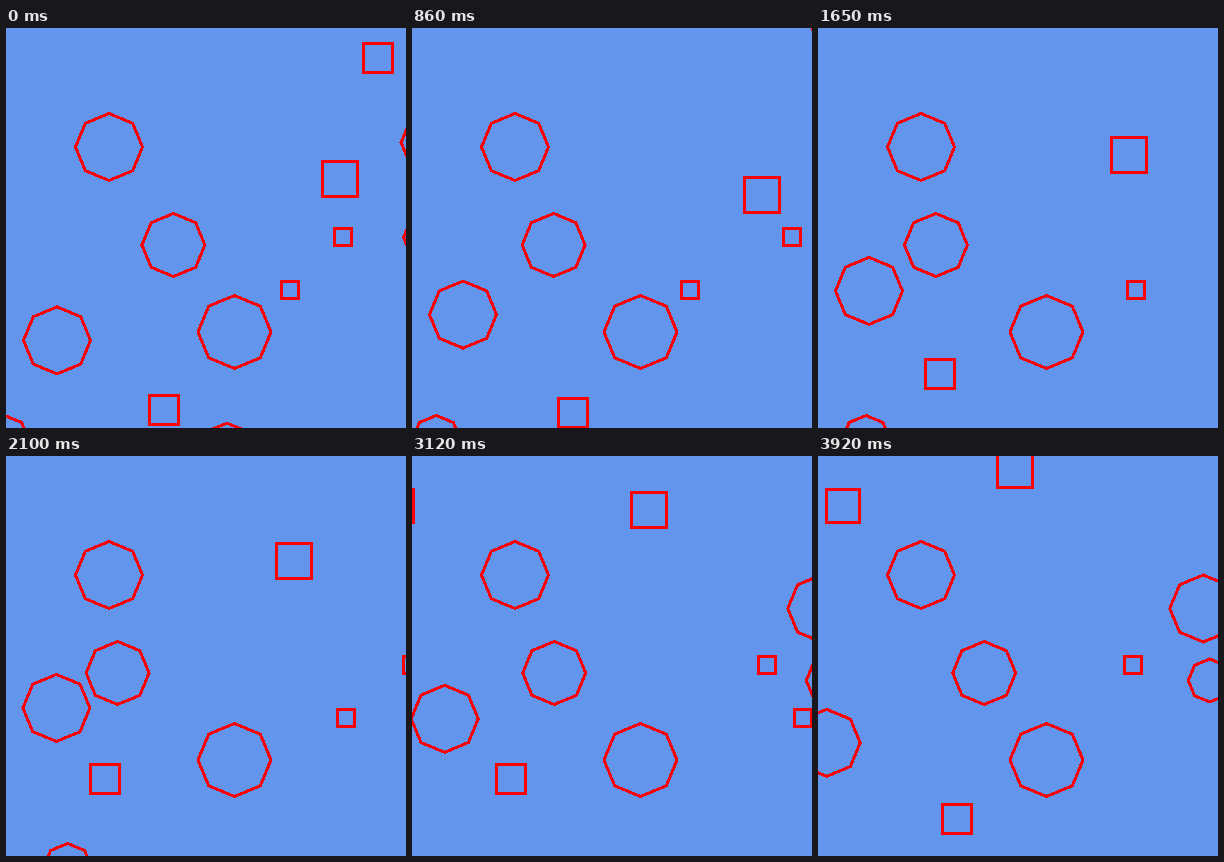
Write an HTML page that moves like this. It is 400 by 400 pixels and loops after 3950 ms.

```html
<!DOCTYPE html>
<html>
<head>
<meta charset="utf-8">
<style>
html, body { margin: 0; width: 100%; height: 100%; overflow: hidden; background: #6495ed; }
svg { display: block; fill: none; stroke: #f00; stroke-width: 3; shape-rendering: crispEdges; }
</style>
</head>
<body>
<svg id="stage" width="400" height="400"></svg>
<script>
const stage = document.getElementById('stage');
const LOOP = 3.95, LEAD = 0.02; // seconds

// Every body drifts at constant speed (px/s); each turn [time, dx, dy] gives it a new heading
const bodies = [];

function add(sides, radius, tilt, speed, x, y, turns) {
  const node = document.createElementNS('http://www.w3.org/2000/svg', 'polygon');
  const corner = (_, i) => {
    const a = tilt + i * 2 * Math.PI / sides;
    return [radius * Math.cos(a), radius * Math.sin(a)];
  };
  node.setAttribute('points', Array.from({ length: sides }, corner).join(' '));
  stage.append(node);
  bodies.push({ node, speed, x, y, turns });
}

const octagon = (r, x, y, ...turns) => add(8, r, 0, 30, x, y, turns);
const square = (side, x, y, ...turns) => add(4, side * Math.SQRT1_2, Math.PI / 4, 50, x, y, turns);

octagon(33.5, 103, 119);
octagon(36.5, 228.5, 304);
octagon(31.5, 168, 217, [0, -1, 0], [2, 1, 0]);
octagon(33.5, 51, 313, [0, 0, -1], [2, -0.16, -0.29], [2.63, -1, 1]);
octagon(24, -2, 411.5, [0, 1, 0], [2.23, 1, 1]);
octagon(24, 221, 418.5, [0, 0, 1]);
octagon(33.5, 428, 114.5, [0, 1, 0]);
octagon(21.5, 418.5, 209.5, [0, 1, 0]);
octagon(33.5, 503.5, 152.5, [0, -1, 0]);
octagon(21.5, 510, 224.5, [0, -1, 0]);

square(35, 333, 149.5, [0, 1, 1], [0.61, -1, -1]);
square(29, 157, 381, [0, 1, 1], [0.48, -1, -1], [2.63, 1, 1]);
square(17, 336, 209, [0, 1, 0], [1.76, -1, 0]);
square(17, 285, 262, [0, -1, 0], [0.51, 1, 0]);
square(29, 370.5, 30.5, [0, 1, -1]);
square(33, -172.5, 50, [0, 1, 0]);

function place({ node, speed, x, y, turns }, t) {
  turns.forEach(([from, dx, dy], i) => {
    const until = Math.min(t, turns[i + 1]?.[0] ?? t);
    const way = speed * Math.max(0, until - from);
    x += dx * way;
    y += dy * way;
  });
  node.setAttribute('transform', `translate(${x} ${y})`);
}

let start;
function draw(now) {
  start ??= now;
  const t = (now - start) / 1000 % LOOP + LEAD;
  for (const body of bodies) place(body, t);
  requestAnimationFrame(draw);
}
requestAnimationFrame(draw);
</script>
</body>
</html>
```
